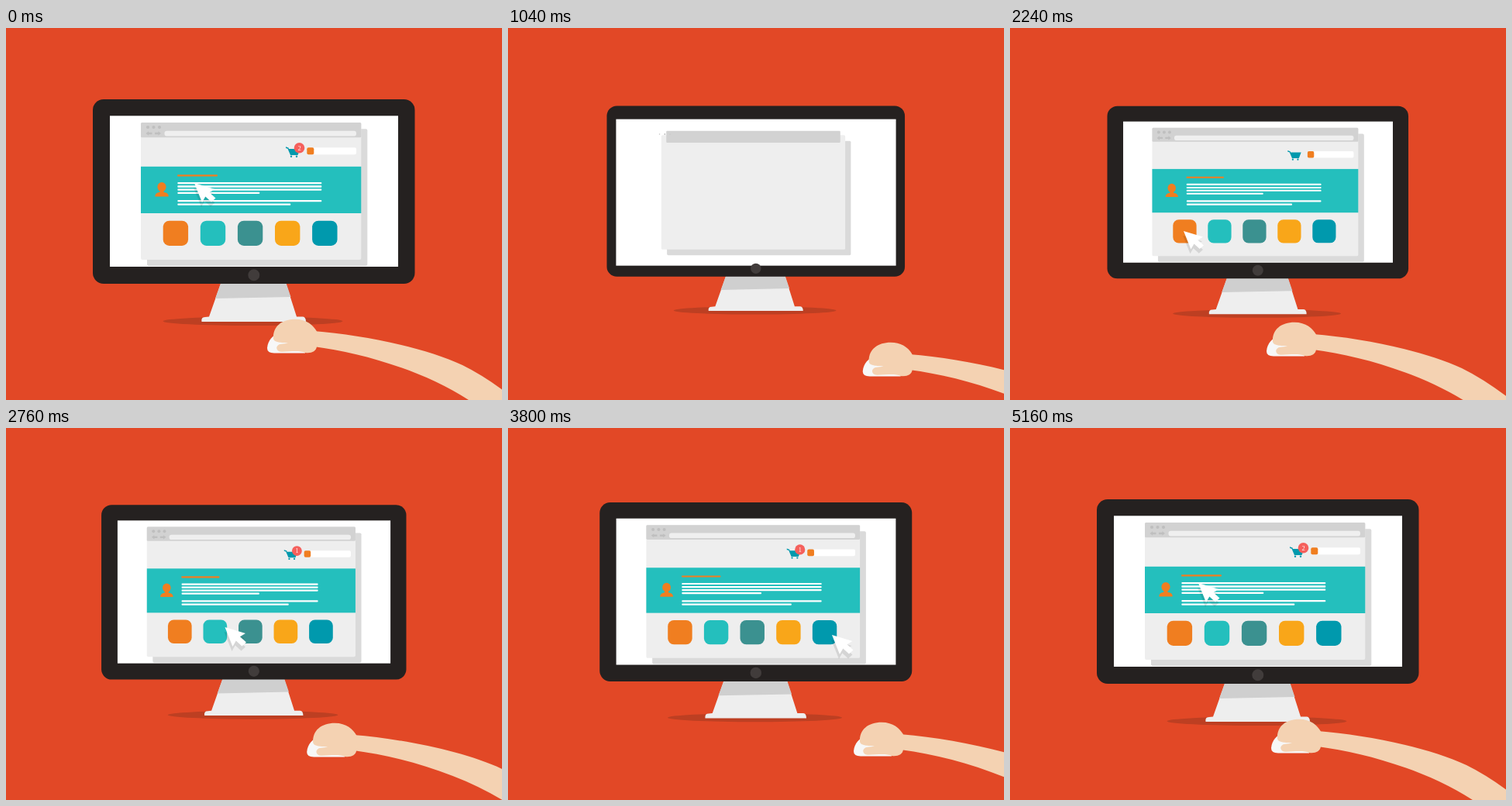
Recreate the animation shown at these times as an HTML page. Size 640x480 px, loop 5200 ms.

```html
<!DOCTYPE html>
<html lang="en">
<head>
<meta charset="utf-8">
<title>Shop monitor</title>
<style>
  html, body { margin: 0; width: 100%; height: 100%; overflow: hidden; background: #f7f7f7; }
  svg { display: block; width: 640px; height: 480px; }
  [data-at] { transform-box: fill-box; transform-origin: center; }
  text { font: 8.5px "Liberation Serif", serif; fill: #fff; text-anchor: middle; }
  .orange { fill: #f07e20; }
  .teal { fill: #24bfbd; }
  .blue { fill: #0099ad; }
  .white { fill: #fff; }
  .mark { fill: #bfbfbf; }
  .skin { fill: #f4d2b2; }
</style>
</head>
<body>
<svg viewBox="0 0 640 480">
  <rect width="640" height="480" fill="#f7f7f7"/>
  <circle id="disc" cx="320" cy="240" fill="#e24826"/>

  <g id="camera">
    <ellipse data-at="580" cx="318.5" cy="378.3" rx="116" ry="5.7" fill="#bd3f22"/>
    <g id="stand">
      <path d="M283 313H356L375 372.5H383Q387 373 387 379H252.500Q251.500 373 257 373L262 372.500Z" fill="#eee"/>
      <path id="shade" d="M283 313H356L367.500 347L270 349Z" fill="#cfcfcf"/>
      <g id="monitor">
        <rect x="112" y="92" width="415.500" height="238" rx="14" fill="#252120"/>
      </g>
    </g>
    <rect id="screen" x="134" y="113.300" width="372" height="194.700" fill="#fff"/>
    <circle id="button" cx="319.800" cy="318.700" r="7.500" fill="#413c3b"/>

    <g data-at="823">
      <rect x="182" y="130.300" width="284.300" height="176.700" rx="2" fill="#dadada"/>
    </g>
    <rect data-at="823" x="174" y="122" width="284.300" height="177" rx="2" fill="#eee"/>
    <rect data-at="864" x="174" y="122" width="284.300" height="19.300" rx="1.500" fill="#d2d2d2"/>
    <g class="mark">
      <circle data-at="1000" cx="183" cy="128" r="2.100"/>
      <circle data-at="980" cx="190.500" cy="128" r="2.100"/>
      <circle data-at="1010" cx="198" cy="128" r="2.100"/>
      <path data-at="1060" d="M180.500 136l3.600-2.700v1.500h4.400v2.400h-4.400v1.500z"/>
      <path data-at="1100" d="M200 136l-3.600-2.700v1.500h-4.400v2.400h4.400v1.500z"/>
    </g>
    <rect data-at="1080" x="204.500" y="132.700" width="247.500" height="6.700" rx="3" fill="#efefef"/>

    <g data-at="1180" class="blue">
      <path d="M361 153.300L364.500 154.500L365 156H379.500L376.500 164H367L363.500 155.700L361 155Z"/>
      <circle cx="368" cy="165.700" r="1.200"/>
      <circle cx="375" cy="165.700" r="1.200"/>
    </g>
    <rect data-at="1220" class="white" x="396" y="154.300" width="56" height="9" rx="2"/>
    <rect data-at="1200" class="orange" x="388.300" y="154.300" width="9" height="9" rx="2"/>
    <g data-at="2320">
      <circle cx="378.500" cy="154.700" r="6.800" fill="#f5605c"/>
      <text id="count" x="378.500" y="157.600">1</text>
    </g>

    <rect data-at="1140" class="teal" x="174" y="178.800" width="284.300" height="60.200"/>
    <g data-at="1240" class="orange">
      <ellipse cx="201" cy="205" rx="5.600" ry="6"/>
      <path d="M198.500 209h5v2.700q6.300.8 6.300 5.800H192.300q0-5 6.200-5.800z"/>
    </g>
    <rect data-at="1610" class="orange" x="221" y="189.300" width="52" height="2.200" rx="1"/>
    <g id="lines" class="white"></g>
    <g id="tiles"></g>
  </g>

  <g id="cursor">
    <path id="arrow" d="M0 0L26.500 8L19.500 12.300L27.500 19.500L22 24.500L14.300 17.500L10 25Z" fill="#000" fill-opacity=".1" transform="translate(-1 6)"/>
    <path d="M0 0L26.500 8L19.500 12.300L27.500 19.500L22 24.500L14.300 17.500L10 25Z" fill="#fff"/>
  </g>

  <g id="hand">
    <path d="M337 413C338 402 345 396 352 394L386 404V419.500H346Q337 419.500 337 413Z" fill="#f7f7f7"/>
    <path class="skin" d="M397 391C460 396 540 412 589 435Q650 465 730 545L690 570Q640 510 597 480C540 443 460 419 397 411Z"/>
    <path class="skin" d="M345 401C344 385 356 375.700 373 375.700C388 375.700 397 384 401 391.500V411C400 417.500 394 420 386 419C380 416 370 417 356 417.700C350 418 348 413 350 410.500C352 407 358 408 364 406.500C356 406 346 406 345 401Z"/>
  </g>
</svg>

<script>
const LOOP = 5200, END = 5160;
const $ = id => document.getElementById(id);

function addRect(parent, at, x, y, w, h, rx, fill) {
  const el = document.createElementNS("http://www.w3.org/2000/svg", "rect");
  const attrs = { x, y, width: w, height: h, rx, "data-at": at };
  if (fill) attrs.fill = fill;
  for (const name in attrs) el.setAttribute(name, attrs[name]);
  parent.append(el);
}

// start time, y, width
[[1460, 200.2, 186], [1500, 204.5, 186], [1540, 208.6, 186],
 [1580, 212.8, 106], [1678, 223.2, 186], [1718, 227.6, 146]]
  .forEach(([at, y, w]) => addRect($("lines"), at, 221.3, y - 1.15, w, 2.3, 1));

["#f07e20", "#24bfbd", "#3b9190", "#f9a619", "#0099ad"]
  .forEach((fill, i) => addRect($("tiles"), [1340, 1464, 1581, 1674, 1780][i],
    202.7 + 48.1 * i, 248.7, 32.4, 32.2, 8, fill));

const pops = [...document.querySelectorAll("[data-at]")]
  .map(el => ({ el, at: +el.dataset.at }));

const clamp = v => Math.max(0, Math.min(1, v));
const grow = (t, at) => t <= at ? 0 : 1 - Math.exp(-0.0115 * (t - at));
const spring = (t, at, damp, freq) =>
  t <= at ? 0 : 1 - Math.exp(-damp * (t - at)) * Math.cos(freq * (t - at));

const ease = {
  lin: p => p,
  in: p => p * p,
  out: p => 1 - (1 - p) ** 2,
  both: p => p < 0.5 ? 4 * p ** 3 : 1 - 4 * (1 - p) ** 3
};

// keys: time, x, y, easing towards this key
function along(keys, t) {
  let i = keys.findIndex(k => k[0] > t);
  if (i === 0) return keys[0].slice(1, 3);
  if (i < 0) return keys[keys.length - 1].slice(1, 3);
  const a = keys[i - 1], b = keys[i];
  const p = ease[b[3]]((t - a[0]) / (b[0] - a[0]));
  return [a[1] + (b[1] - a[1]) * p, a[2] + (b[2] - a[2]) * p];
}

const handPath = [
  [800, 360, 70], [1040, 121, 30, "out"], [1680, 27, 7, "out"],
  [2180, -6, 4, "both"], [2400, -6, 4, "lin"], [2760, 51, 5, "in"],
  [3320, 106, 4, "out"], [3800, 109, 4, "lin"], [4380, 109, 4, "lin"],
  [5080, 0, 0, "both"]
];
const cursorPath = [
  [1520, 306, 253], [1680, 306, 253, "lin"], [2180, 224, 262, "both"],
  [2400, 224, 262, "lin"], [2760, 282, 257, "in"], [3320, 416, 266, "out"],
  [3800, 418, 267, "lin"], [4380, 418, 267, "lin"], [5080, 243, 200, "both"]
];

const press = (t, at) => 0.14 * Math.max(0, 1 - Math.abs(t - at) / 100);

const scaleAt = (el, x, y, s) =>
  el.setAttribute("transform", `translate(${x} ${y}) scale(${s}) translate(${-x} ${-y})`);

function draw(time) {
  const t = time < 40 ? END : Math.min(time, END);

  $("disc").setAttribute("r", 410 * ease.both(clamp((t - 120) / 800)));
  scaleAt($("camera"), 320, 227, 1 - 2.22e-5 * (END - t));

  const body = spring(t, 475, 0.006, 0.0039);
  scaleAt($("stand"), 319.7, 379, grow(t, 458));
  scaleAt($("monitor"), 319.8, 319, body);
  $("shade").setAttribute("opacity", clamp(body));
  scaleAt($("screen"), 320, 210.6, spring(t, 640, 0.005, 0.00525));
  scaleAt($("button"), 319.8, 318.7, grow(t, 700));

  for (const { el, at } of pops) el.style.scale = grow(t, at);
  $("count").textContent = t < 3980 ? "1" : "2";

  const [cx, cy] = along(cursorPath, t);
  const size = grow(t, 1440) * (1 - press(t, 2300) - press(t, 3960));
  $("cursor").setAttribute("transform", `translate(${cx} ${cy}) scale(${size})`);

  const [hx, hy] = along(handPath, t);
  $("hand").setAttribute("transform", `translate(${hx} ${hy})`);
}

const begin = performance.now();
function tick() {
  draw((performance.now() - begin) % LOOP);
  requestAnimationFrame(tick);
}
tick();
</script>
</body>
</html>
```
